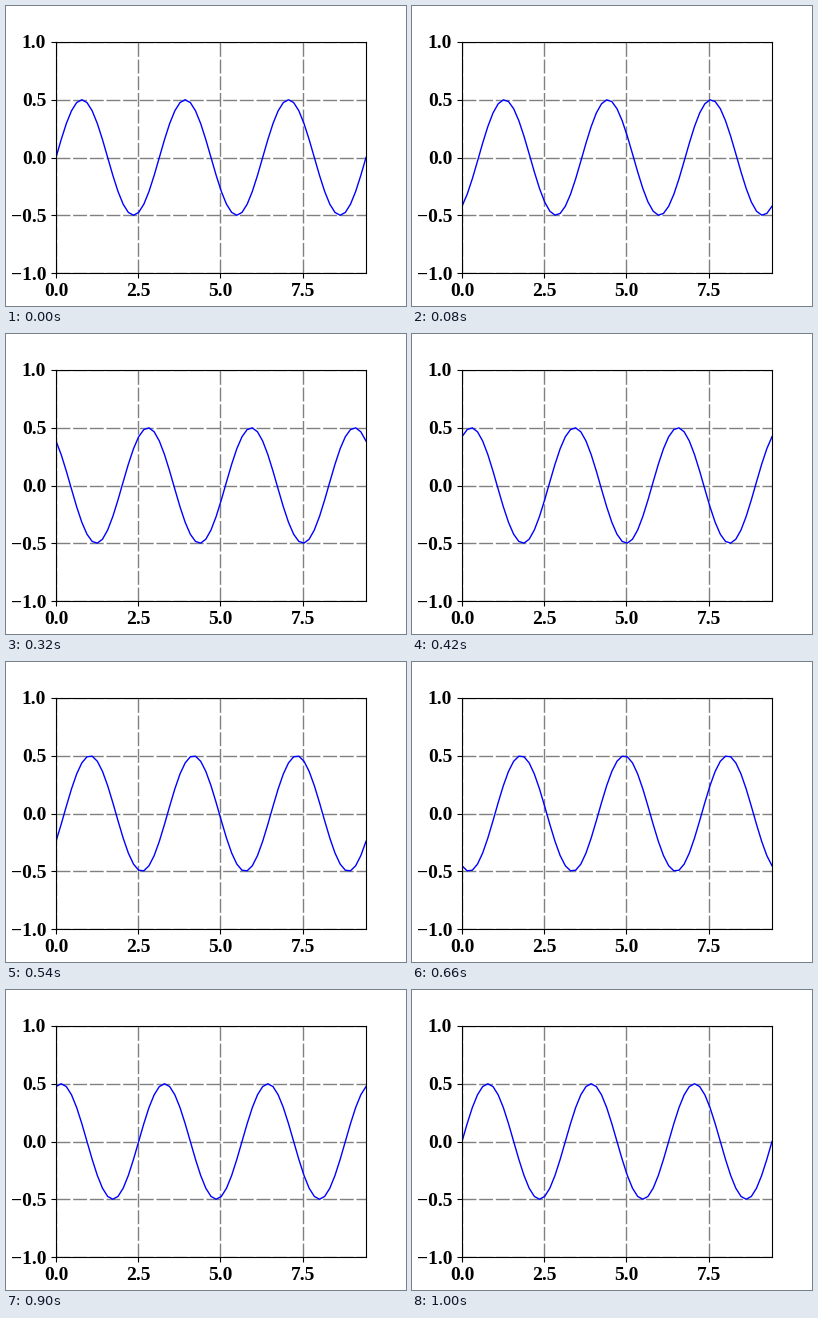
Animation, 400 px wide and 300 px high, one loop 1.02 s. Source, as a matplotlib script:

```python
import numpy as np
import matplotlib.pyplot as plt
from matplotlib.animation import FuncAnimation

FRAMES = 51
STEP = np.pi / 25  # distance the wave travels per frame

plt.rcParams.update({
    "font.family": "Liberation Serif",
    "font.weight": "bold",
    "font.size": 14,
})

fig, ax = plt.subplots(figsize=(4, 3), dpi=100)
x = np.linspace(0, 3 * np.pi, 61)
line, = ax.plot(x, 0.5 * np.sin(2 * x), color="blue", lw=1)

ax.set_xlim(0, 3 * np.pi)
ax.set_ylim(-1, 1)
ax.set_xticks([0, 2.5, 5, 7.5])
ax.set_yticks([-1, -0.5, 0, 0.5, 1])
ax.xaxis.set_major_formatter("{x:.1f}")
ax.yaxis.set_major_formatter("{x:.1f}")
ax.set_axisbelow(True)
ax.grid(color="gray", lw=1, linestyle=(0, (10, 2)))


def update(i):
    line.set_ydata(0.5 * np.sin(2 * (x - i * STEP)))
    return line,


anim = FuncAnimation(fig, update, frames=FRAMES, interval=20, repeat=True,
                     repeat_delay=0)
plt.show()
```
